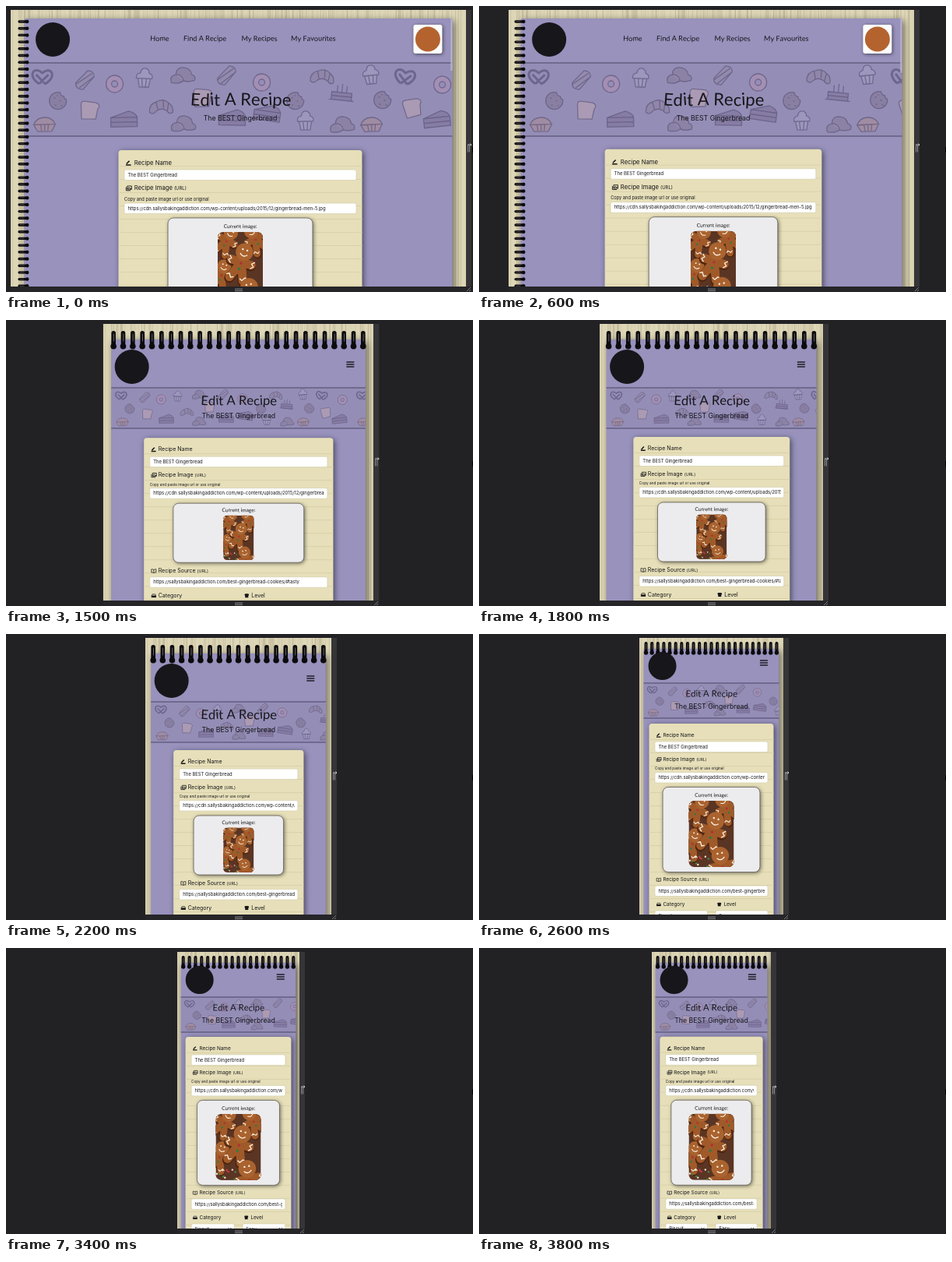
These frames come from a looping animation (600 px wide and 367 px high, 3.9 s). An HTML page with a canvas:

```html
<!DOCTYPE html>
<html lang="en">
<head>
<meta charset="utf-8">
<title>Responsive recipe form</title>
<style>
html, body { margin: 0; width: 100%; height: 100%; overflow: hidden; background: #222124; }
canvas { display: block; width: 600px; height: 367px; }
</style>
</head>
<body>
<canvas id="stage"></canvas>
<script>
const canvas = document.getElementById('stage');
const ctx = canvas.getContext('2d');
const dpr = Math.max(1, window.devicePixelRatio || 1);
canvas.width = 600 * dpr;
canvas.height = 367 * dpr;

const LOOP = 3900, STEP = 100, TOP = 5, BOTTOM = 360;
const INK = '#17161a', LILAC = '#9892bd';

// Left edge of the viewport over time; the right edge mirrors it.
const EDGE = [[0, 6], [600, 38], [1100, 81], [1200, 94.5], [1800, 155],
  [2400, 191], [2600, 206], [3000, 216], [3600, 222], [3900, 222]];

// Row positions (name ... selects) are measured from the top of the form.
const DESKTOP = { cx: 301, page: 16, line: 73, banner: 94, title: 22, titleY: 121, subY: 144,
  logoX: 36.5, logoY: 43, logoR: 22, form: 185, formW: .535, refW: 585, drift: 50, cardW: .594,
  label: 7.7, small: 5.7, gap: 12.7, name: 16.5, in1: 25, image: 49, copy: 63, in2: 68,
  card: 87, cardH: 109, caption: 98, photo: 105, scale: 1, source: 206, in3: 214, category: 238, selects: 246 };
const TABLET = { cx: 298.8, page: 25, line: 87, banner: 52, title: 16.6, titleY: 104, subY: 123,
  logoX: 26.5, logoY: 60, logoR: 22, form: 150, formW: .7, refW: 287, drift: 50, cardW: .69,
  label: 7, small: 4.75, gap: 11, name: 15, in1: 24, image: 48, copy: 60, in2: 64.5,
  card: 84, cardH: 76, caption: 93, photo: 99.5, scale: .675, source: 171, in3: 178.5, category: 202.5, selects: 211,
  ringY: 26, ring: 1.4, ringGap: 12, menuY: 57 };
const MOBILE = { cx: 298.5, page: 19, line: 63, banner: 45, title: 11.3, titleY: 77, subY: 93,
  logoX: 24, logoY: 41, logoR: 18, form: 115, formW: .865, refW: 185, drift: 25, cardW: .78,
  label: 6.4, small: 4.65, gap: 10.4, name: 15, in1: 23, image: 46, copy: 58, in2: 62.5,
  card: 81.5, cardH: 109, caption: 92, photo: 99, scale: 1, source: 200.5, in3: 208, category: 232, selects: 240,
  ringY: 18.5, ring: 1, ringGap: 7.5, menuY: 37 };

const noise = i => { const v = Math.sin(i * 12.9898) * 43758.5453; return v - Math.floor(v); };

function edgeAt(t) {
  const i = EDGE.findIndex(k => k[0] > t);
  const [t0, x0] = EDGE[i - 1], [t1, x1] = EDGE[i];
  return x0 + (x1 - x0) * (t - t0) / (t1 - t0);
}

function rect(x, y, w, h, fill) {
  ctx.fillStyle = fill;
  ctx.fillRect(x, y, w, h);
}

function box(x, y, w, h, r, fill, { blur = 0, border } = {}) {
  ctx.save();
  ctx.beginPath();
  ctx.roundRect(x, y, w, h, r);
  if (blur) {
    ctx.shadowColor = 'rgba(0,0,0,.55)';
    ctx.shadowBlur = blur * dpr;
    ctx.shadowOffsetX = ctx.shadowOffsetY = blur / 4 * dpr;
  }
  ctx.fillStyle = fill;
  ctx.fill();
  ctx.shadowColor = 'transparent';
  if (border) {
    ctx.strokeStyle = border;
    ctx.lineWidth = .7;
    ctx.stroke();
  }
  ctx.restore();
}

function clipped(x, y, w, h, r, draw) {
  ctx.save();
  ctx.beginPath();
  ctx.roundRect(x, y, w, h, r);
  ctx.clip();
  draw();
  ctx.restore();
}

function placed(x, y, scale, angle, draw) {
  ctx.save();
  ctx.translate(x, y);
  ctx.rotate(angle);
  ctx.scale(scale, scale);
  draw();
  ctx.restore();
}

function disc(x, y, r, fill) {
  ctx.fillStyle = fill;
  ctx.beginPath();
  ctx.arc(x, y, r, 0, 7);
  ctx.fill();
}

function stroke(path, width, color) {
  ctx.lineWidth = width;
  ctx.strokeStyle = color;
  ctx.stroke(new Path2D(path));
}

function text(str, x, y, size, align = 'left') {
  ctx.font = `${size}px Inter, sans-serif`;
  ctx.textAlign = align;
  ctx.fillStyle = INK;
  ctx.fillText(str, x, y);
  return ctx.measureText(str).width;
}

// Centred lettering with a slight wobble per letter.
function handwritten(str, cx, y, size) {
  ctx.font = `${size}px Lato, sans-serif`;
  ctx.textAlign = 'center';
  ctx.fillStyle = INK;
  let x = cx - ctx.measureText(str).width / 2;
  [...str].forEach((ch, i) => {
    const w = ctx.measureText(ch).width;
    placed(x + w / 2, y + Math.sin(i * 2.3) * size * .03, 1, Math.sin(i * 1.7 + 1) * .08,
      () => ctx.fillText(ch, 0, 0));
    x += w;
  });
}

const SHAPES = {
  pretzel: ['M-4 9C-20-1-11-15 0-5C11-15 20-1 4 9M-4 9L8-3M4 9L-8-3', null],
  stack: ['M-12 2L4-13Q12-12 12-5L-3 11Q-13 11-12 2M-12 4L9-9M-8 9L12-5', '#9389ab'],
  donut: ['M11 0A11 11 0 1 1-11 0A11 11 0 1 1 11 0M4 0A4 4 0 1 0-4 0A4 4 0 1 0 4 0', '#ab90b4'],
  cupcake: ['M-8 1H8L6 12H-6ZM-10 1Q-11-5-5-6Q-4-13 2-12Q7-10 6-6Q12-4 10 1ZM-3 1L-2 12M3 1L2 12', '#a29bc1'],
  croissant: ['M-15 7Q-16-4-6-7Q2-12 9-6Q16-2 15 6Q11 9 7 4Q0 0-6 5Q-10 11-15 7M-7-6L-4 3M2-9L3 1M9-6L8 4', '#8f84a4'],
  buns: ['M-15 8Q-17-1-8-2Q-7-11 2-10Q12-8 12 0Q18 3 15 8Q6 10 1 7Q-6 11-15 8M-8-2Q0-1 1 7', '#897e9f'],
  bread: ['M-11-6Q-12-12-4-11H8Q15-9 11-3L10 10L-8 12Z', '#b5a0b3'],
  cookie: ['M11-2A11 11 0 1 1 3-11Q4-6 8-6Q8-2 11-2M-5-4h2M2 0h2M-4 5h2M4 6h2M-1-7h1', '#857a9b'],
  slice: ['M-17-3L6-11Q15-9 17-3V9H-17ZM-17-3H17M-17 3H17', '#81769d'],
  pie: ['M-14 0Q-10-9 0-9Q10-9 14 0ZM-14 0L-9 9H9L14 0M-5 0L-4 8M0 0V8M5 0L4 8', '#a58c9a'],
  cake: ['M-13 0H13V10H-13ZM-13 5H13M-6 0V-9M0 0V-11M6 0V-9M-16 10H16', '#82779e']
};
const DOODLES = [
  ['pretzel', 23, 91], ['stack', 78, 96], ['donut', 116, 100], ['cupcake', 154, 92], ['buns', 203, 89],
  ['stack', 260, 90], ['donut', 305, 98], ['croissant', 383, 91], ['cake', 408, 111],
  ['cupcake', 445, 88], ['pretzel', 489, 91], ['donut', 537, 101], ['cookie', 43, 122], ['bread', 83, 134],
  ['slice', 128, 146], ['croissant', 176, 130], ['buns', 204, 151], ['bread', 228, 118],
  ['slice', 267, 144], ['cookie', 348, 122], ['cupcake', 361, 147], ['buns', 408, 152], ['pie', 446, 152],
  ['cookie', 460, 121], ['bread', 498, 131], ['slice', 530, 146], ['pie', 26, 152], ['slice', 312, 138]
];

function banner(m, x, w) {
  const scale = m.banner / 94;
  rect(x, m.line, w, m.banner, '#948eb7');
  clipped(x, m.line, w, m.banner, 0, () => {
    ctx.globalAlpha = .7;
    for (let tile = 0; tile * scale < w; tile += 560) {
      DOODLES.forEach(([kind, dx, dy], i) => {
        const [path, fill] = SHAPES[kind];
        placed(x + (tile + dx) * scale, m.line + (dy - 73) * scale, scale, (noise(i + 3) - .5) * .3, () => {
          ctx.fillStyle = fill;
          if (fill) ctx.fill(new Path2D(path), 'evenodd');
          stroke(path, fill ? 1.3 : 3, '#5f577c');
        });
      });
    }
  });
  rect(x, m.line - .5, w, 1, '#4c4765');
  rect(x, m.line + m.banner - .5, w, 1, '#4c4765');
}

function wood(x, w) {
  rect(x, TOP, w, BOTTOM - TOP, '#dfd8b8');
  for (let i = 0; i * 1.7 < w; i++) {
    rect(x + i * 1.7, TOP, .5 + noise(i), BOTTOM - TOP, `rgba(120,108,80,${noise(i + 500) ** 2 * .35})`);
  }
}

function ring(x, y, scale, angle) {
  placed(x, y, scale, angle, () => {
    disc(5.5, 0, 2.7, '#0c0b0d');
    box(-8.5, -2, 14, 4, 2, '#0c0b0d');
    rect(-6, -.5, 7, .6, '#77737d');
  });
}

const ICONS = {
  pen: () => stroke('M0 2.5H6.5M.8 1L4.5-2.7', 1.6, INK),
  images: () => { stroke('M1.8-3H7.3V1.3H1.8ZM.3-1.5V2.8H6', .9, INK); stroke('M2 .6L4-1L7 .8', 1, INK); },
  book: () => stroke('M3.5-1.8V2.6Q2 1.7.2 2V-2.6Q2-3 3.5-1.8Q5-3 6.8-2.6V2Q5 1.7 3.5 2.6', .8, INK),
  inbox: () => { stroke('M.5 0L1.5-2H5.5L6.5 0', .8, INK); rect(.1, -.2, 6.8, 2.8, INK); },
  hat: () => { rect(1, -1, 4.5, 3.8, INK); box(.3, -2.8, 6, 3, 1.5, INK); }
};

function label(icon, str, x, y, m, note) {
  placed(x + 2, y, m.label / 7.7, 0, ICONS[icon]);
  const w = text(str, x + m.gap, y, m.label);
  if (note) text(note, x + m.gap + w + 2, y + .3, m.label * .77);
}

function field(str, x, y, w) {
  box(x, y, w, 13.5, 2, '#fff', { border: '#d5cfae' });
  clipped(x + 4, y, w - 8, 13.5, 0, () => text(str, x + 4.5, y + 7, 5.87));
}

function select(str, x, y, w) {
  field(str, x, y, w);
  placed(x + w - 6, y + 6, 1, 0, () => stroke('M-2-1L0 1L2-1', .8, INK));
}

function cookieMan(x, y, size, angle) {
  placed(x, y, size, angle, () => {
    ctx.lineCap = 'round';
    stroke('M-9-2H9M0-2L-6 13M0-2L6 13M0-3V5', 8.4, '#4e2410');
    stroke('M-9-3H9M0-3L-6 12M0-3L6 12M0-3V4', 7.4, '#a05a29');
    disc(0, -12, 7.5, '#aa632f');
    stroke('M-11-6L-9-4L-11-2L-9 0M11-6L9-4L11-2L9 0M-9 10L-7 9L-5 12L-3 11M9 10L7 9L5 12L3 11M-3-10Q0-7 3-10', .9, '#fbeedd');
    disc(-2, -14, .8, '#fbeedd');
    disc(2, -14, .8, '#fbeedd');
    disc(0, -2, 1.1, '#b52d32');
    disc(0, 3, 1.1, '#2e7a44');
  });
}

function photo(x, y, scale) {
  placed(x, y, scale, 0, () => clipped(0, 0, 58, 85, 7, () => {
    rect(0, 0, 58, 85, '#5a3524');
    cookieMan(10, 14, 1.2, .5);
    cookieMan(50, 12, 1.2, -.5);
    cookieMan(4, 58, 1.2, .3);
    cookieMan(29, 43, 1.5, .3);
    cookieMan(44, 88, 1.5, -.2);
    for (let i = 0; i < 12; i++) {
      disc(noise(i) * 26, 70 + noise(i + 40) * 15, 1.2, ['#c23a42', '#3c8d4a', '#f1e2d2'][i % 3]);
    }
  }));
}

function form(m, W) {
  const w = W * m.formW, x = m.cx - w / 2, y = m.form - (m.refW - W) / m.drift;
  const inX = x + 7.5, inW = w - 15;
  box(x, y, w, BOTTOM - y + 20, 4, '#e6dfb9', { blur: 7 });
  for (let ly = y + 20; ly < BOTTOM; ly += 17) rect(x, ly, w, 1, '#d9d1a9');

  label('pen', 'Recipe Name', inX, y + m.name, m);
  field('The BEST Gingerbread', inX, y + m.in1, inW);
  label('images', 'Recipe Image', inX, y + m.image, m, '(URL)');
  text('Copy and paste image url or use original', inX, y + m.copy, m.small);
  field('https://cdn.sallysbakingaddiction.com/wp-content/uploads/2015/12/gingerbread-men-5.jpg', inX, y + m.in2, inW);

  const cardW = w * m.cardW;
  box(m.cx - cardW / 2, y + m.card, cardW, m.cardH, 7, '#ececee', { blur: 5, border: '#55504a' });
  handwritten('Current image:', m.cx, y + m.caption, 6.6);
  photo(m.cx - 29 * m.scale, y + m.photo, m.scale);

  label('book', 'Recipe Source', inX, y + m.source, m, '(URL)');
  field('https://sallysbakingaddiction.com/best-gingerbread-cookies/#tasty', inX, y + m.in3, inW);
  label('inbox', 'Category', inX, y + m.category, m);
  label('hat', 'Level', m.cx + 5.5, y + m.category, m);
  select('Biscuit', inX, y + m.selects, inW / 2 - 5);
  select('Easy', m.cx + 5.5, y + m.selects, inW / 2 - 5.5);
}

function site(L, W) {
  const wide = W > 367;
  const m = wide ? DESKTOP : W > 230 ? TABLET : MOBILE;
  const left = L + W * .03, right = L + W * .97, w = right - left;
  wood(L, W);
  box(left, m.page, w, BOTTOM - m.page + 20, 2, LILAC, { blur: 10 });
  banner(m, left, w);

  if (wide) {
    for (let y = 20; y < BOTTOM; y += 8.7) ring(left - 1, y, .84, 0);
    [['Home', 197], ['Find A Recipe', 255], ['My Recipes', 325], ['My Favourites', 394]]
      .forEach(([str, x]) => handwritten(str, x + .3, 42, 9.1));
    box(right - 50, 24, 37, 37, 3, '#fdfdfd', { blur: 4 });
    disc(right - 31.5, 42.5, 16, '#b4632f');
    rect(right - 2, 16, 2, 67 + (585 - W) / 20, '#b7b3d0');
  } else {
    const count = Math.floor((w - 6) / m.ringGap);
    for (let i = 0; i <= count; i++) {
      ring(left + 3 + i * (w - 6) / count, m.ringY, m.ring, Math.PI / 2);
    }
    for (let i = -1; i < 2; i++) rect(right - 24.5, m.menuY + i * 3 - .7, 10, 1.4, INK);
  }
  disc(left + m.logoX, m.logoY, m.logoR, INK);
  handwritten('Edit A Recipe', m.cx, m.titleY, m.title);
  text('The BEST Gingerbread', m.cx, m.subY, 8.75, 'center');
  form(m, W);
}

function resizer(L, R) {
  rect(L, BOTTOM, R - L + 7, 7, '#262528');
  rect(R, TOP, 7, BOTTOM - TOP, '#353437');
  for (const d of [0, 2.2]) {
    rect(R + 2 + d, 178.5, .8, 9, '#a3a2a5');
    rect(294, 362.7 + d, 10, .8, '#a3a2a5');
  }
  stroke(`M${R + 1} 366L${R + 6} 361M${R + 4} 366L${R + 6} 364`, .7, '#a3a2a5');
  stroke(`M${R + 2} 178h5m-1.5-1.5l1.5 1.5l-1.5 1.5`, .8, '#e4e4e6');
  rect(599, 181, 1, 7, '#000');
}

function draw(t) {
  const L = edgeAt(t), W = 597 - 2 * L;
  ctx.setTransform(dpr, 0, 0, dpr, 0, 0);
  ctx.textBaseline = 'middle';
  rect(0, 0, 600, 367, '#222124');
  clipped(L, TOP, W, BOTTOM - TOP, 0, () => site(L, W));
  resizer(L, L + W);
}

const start = performance.now();
function tick() {
  const t = (performance.now() - start) % LOOP;
  draw(Math.floor(t / STEP) * STEP);
  requestAnimationFrame(tick);
}
tick();
</script>
</body>
</html>
```
